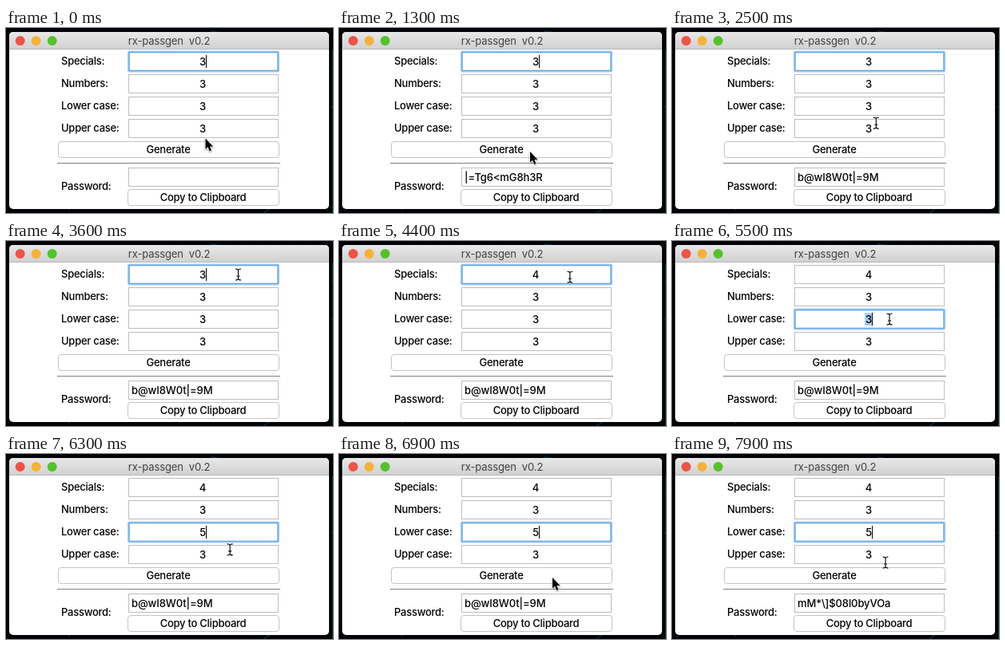
An HTML page that plays this animation: 409x232 px, repeating every 8000 ms.

```html
<!DOCTYPE html>
<html lang="en">
<head>
<meta charset="utf-8">
<title>rx-passgen</title>
<style>
  html, body { margin: 0; width: 100%; height: 100%; overflow: hidden; background: #020407; }
  svg { display: block; width: 409px; height: 232px; }
  text { font: 500 13px Inter, "Open Sans", sans-serif; letter-spacing: -.26px; white-space: pre; fill: #000; }
  .mid { text-anchor: middle; }
  .title { font-weight: 400; letter-spacing: -.12px; fill: #404040; }
  .password { letter-spacing: -.1px; }
  .box { fill: #fff; stroke: #bdbdbd; }
  .button { fill: #fff; stroke: #c4c4c4; }
  .ring { fill: none; stroke: #9fcaf2; stroke-width: 3; }
  .ring + .ring { stroke: #69a6df; stroke-width: 1; }
  #desk { fill: none; stroke: #0b2c45; stroke-width: 1.2; }
  #arrow { filter: drop-shadow(0 1px 1px #0006); }
</style>
</head>
<body>
<svg viewBox="0 0 409 232">
  <defs>
    <linearGradient id="bar" x2="0" y2="1">
      <stop stop-color="#e8e8e8"/><stop offset="1" stop-color="#d1d1d1"/>
    </linearGradient>
    <path id="ibeam" d="M-3.5 -7Q0 -7 0 -5Q0 -7 3.5 -7M0 -5V5M-3.5 7Q0 7 0 5Q0 7 3.5 7M-2 2H2"/>
  </defs>
  <path id="desk"/>
  <path d="M408.5 28V232" stroke="#07420f"/>
  <rect x="4" y="5" width="400" height="222" rx="5" fill="#fff"/>
  <path d="M4 26V10a5 5 0 0 1 5-5H399a5 5 0 0 1 5 5V26Z" fill="url(#bar)"/>
  <path d="M4 26.5H404" stroke="#b8b8b8"/>
  <g id="lights"></g>
  <text class="mid title" x="204" y="21">rx-passgen  v0.2</text>
  <g id="form"></g>
  <path d="M64 169.5H343" stroke="#808080"/>
  <g id="focus">
    <rect class="ring" x="153.5" y="-12" width="187" height="24" rx="1"/>
    <rect class="ring" x="154" y="-11.5" width="186" height="23"/>
    <rect id="selection" x="241" y="-8" width="9" height="16" fill="#a9cdf0"/>
  </g>
  <g id="values"></g>
  <path id="caret" d="M.5 0V16" stroke="#000"/>
  <path id="arrow" d="M0 0V13.4L3 10.7L5.2 16L7.5 15L5.4 9.9H9.5Z" stroke="#fff" stroke-width="1.4" paint-order="stroke"/>
  <g id="beam" fill="none">
    <use href="#ibeam" stroke="#fff" stroke-width="2.6"/>
    <use href="#ibeam" stroke="#000" stroke-width="1.1"/>
  </g>
</svg>
<script>
const LOOP = 8000, STEP = 100;
const ROW_GAP = 28;
const rowY = i => 42 + i * ROW_GAP;
const $ = id => document.getElementById(id);

function add(parent, tag, attrs, content = '') {
  const el = document.createElementNS('http://www.w3.org/2000/svg', tag);
  for (const name in attrs) el.setAttribute(name, attrs[name]);
  el.textContent = content;
  return $(parent).appendChild(el);
}
const label = (x, y, content, cls = '') => add('form', 'text', { x, y, class: cls }, content);
const box = y => add('form', 'rect', { class: 'box', x: 153.5, y: y - 11.5, width: 187, height: 23 });
function button(x, y, width, textX, content) {
  add('form', 'rect', { class: 'button', x, y, width, height: 20, rx: 3.5 });
  label(textX, y + 14.5, content, 'mid');
}

// Dim random streaks on the desktop behind the window.
let seed = 7;
const random = () => (seed = seed * 16807 % 2147483647) / 2147483647;
let streaks = '';
for (let i = 0; i < 90; i++) {
  streaks += `M${random() * 409} ${random() * 232}l${random() * 40 - 20} ${random() * 24 - 12}`;
}
$('desk').setAttribute('d', streaks);

['#ed5347', '#f5b23a', '#55c22c'].forEach((fill, i) =>
  add('lights', 'circle', { cx: 17.7 + i * 20, cy: 16, r: 6, fill }));

const counts = ['Specials:', 'Numbers:', 'Lower case:', 'Upper case:'].map((name, i) => {
  label(69, rowY(i) + 4, name);
  box(rowY(i));
  return add('values', 'text', { x: 246, y: rowY(i) + 5, class: 'mid' }, '3');
});
button(65.5, 142.5, 276, 203, 'Generate');
label(69, 203, 'Password:');
box(187);
button(152.5, 202.5, 189, 246.5, 'Copy to Clipboard');
const password = add('values', 'text', { x: 157, y: 192, class: 'password' });

const passwords = [[0, ''], [500, 'R4{kV7<p=2Tj'], [1300, '|=Tg6<mG8h3R'], [2100, 'b@wI8W0t|=9M'],
  [7100, 'k;8Wr!f3|Da0z:Q'], [7700, 'mM*\\]$08l0byVOa']];
const current = (track, t) => track.findLast(([start]) => start <= t)[1];

// The digit is deleted, then another one is typed.
const retyped = (t, erase, type, digit) => t < erase ? '3' : t < type ? '' : digit;

// Pointer glides, each from where the last one ended.
const home = { x: 249.5, y: 138.5 };
const glides = [
  { from: 0, to: 300, x: 239, y: 155 },
  { from: 2200, to: 3000, x: 290.5, y: 42 },
  { from: 4300, to: 5000, x: 261.5, y: 100 },
  { from: 5000, to: 5100, x: 242, y: 103.5 },
  { from: 5400, to: 5500, x: 272, y: 98 },
  { from: 5500, to: 5700, x: 287, y: 97 },
  { from: 6100, to: 6600, x: 267.5, y: 162 },
  { from: 6700, to: 6900, x: 267, y: 155 },
  { from: 7600, to: 7900, x: 267, y: 136 }
];
const smooth = p => p * p * (3 - 2 * p);
function pointerAt(t) {
  let { x, y } = home;
  for (const glide of glides) {
    const p = smooth(Math.min(1, Math.max(0, (t - glide.from) / (glide.to - glide.from))));
    x += (glide.x - x) * p;
    y += (glide.y - y) * p;
  }
  return { x, y };
}

const show = (el, on) => el.setAttribute('visibility', on ? 'visible' : 'hidden');
const place = (el, x, y) => el.setAttribute('transform', `translate(${x} ${y})`);

function draw(t) {
  const click = 5100, drag = 5500, erase = 5900;
  password.textContent = current(passwords, t);
  counts[0].textContent = retyped(t, 3900, 4100, '4');
  counts[2].textContent = retyped(t, erase, 6000, '5');

  const row = t < click ? 0 : 2;
  place($('focus'), 0, rowY(row));
  show($('selection'), t >= drag && t < erase);

  const dragStart = t >= click && t < drag;
  const caretX = dragStart ? 241 : counts[row].textContent ? 250 : 246;
  place($('caret'), caretX, rowY(row) - 8);
  const blinkStart = t < click ? -110 : click - 20;
  show($('caret'), (t - blinkStart) % 910 < 600);

  const { x, y } = pointerAt(t);
  const overEntry = counts.some((_, i) => Math.abs(y - rowY(i)) <= 12);
  for (const id of ['arrow', 'beam']) {
    place($(id), x, y);
    show($(id), (id === 'beam') === overEntry);
  }
}

const begin = performance.now();
function tick() {
  const t = (performance.now() - begin) % LOOP;
  draw(Math.floor(t / STEP) * STEP);
  requestAnimationFrame(tick);
}
tick();
</script>
</body>
</html>
```
